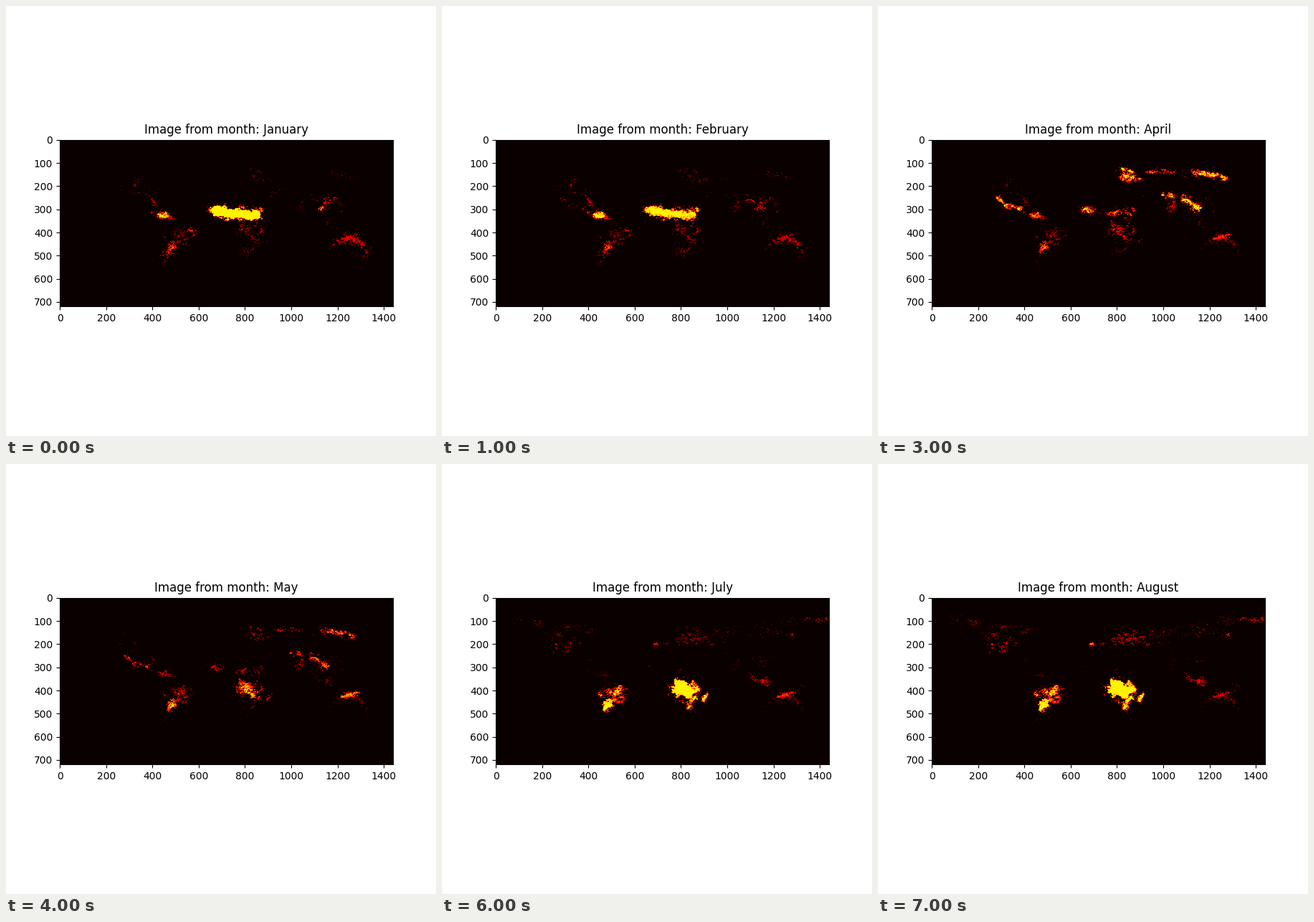
A matplotlib script that plays this animation: 600x600 px, repeating every 8000 ms.

```python
import numpy as np
import matplotlib.pyplot as plt
from matplotlib.animation import FuncAnimation

MONTHS = ["January", "February", "March", "April",
          "May", "June", "July", "August"]
COLS, ROWS = 465, 232
EXTENT = (-0.5, 1439.5, 719.5, -0.5)
CAP = 0.73                     # brightest value: yellow, never white

X, Y = np.meshgrid((np.arange(COLS) + 0.5) * 1440 / COLS,
                   (np.arange(ROWS) + 0.5) * 720 / ROWS)
heat = np.zeros((len(MONTHS), ROWS, COLS))


def clumpy_noise(seed, power):
    """Uniform noise in 0..1, slightly stretched sideways."""
    white = np.random.default_rng(seed).standard_normal((ROWS, COLS))
    freq = np.hypot(np.fft.fftfreq(ROWS)[:, None], 1.4 * np.fft.fftfreq(COLS))
    field = np.fft.ifft2(np.fft.fft2(white) / (freq + 0.03) ** power).real
    return field.ravel().argsort().argsort().reshape(ROWS, COLS) / field.size


def season(month, spread):
    """Bell curve over the months, January being 0."""
    return np.exp(-((np.arange(len(MONTHS)) - month) / spread) ** 2)


def distance(points):
    """Distance of every cell to a line through the points."""
    best = np.full(X.shape, np.inf)
    for (x0, y0), (x1, y1) in zip(points, points[1:] or points):
        dx, dy = x1 - x0, y1 - y0
        t = ((X - x0) * dx + (Y - y0) * dy) / max(dx * dx + dy * dy, 1)
        t = np.clip(t, 0, 1)
        best = np.minimum(best, np.hypot(X - x0 - t * dx, Y - y0 - t * dy))
    return best


def burn(when, peak, width, *points, base=0.0):
    """Fire belt along points, ragged at the edge, rising from base."""
    shape = np.exp(-(distance(points) / width * (0.6 + 0.8 * rough)) ** 3)
    level = base + peak * when
    np.maximum(heat, level[:, None, None] * shape, out=heat)


rough = clumpy_noise(3, 1.5)

new_year = season(-0.5, 2.5)
dry = season(1.2, 2.8)
thaw = season(2, 0.9)
spring = season(3.2, 1.3)
long_spring = season(2.8, 2)
summer = season(6.8, 1.5)
southern = season(6.8, 2.6)

# North America
burn(season(7.5, 0.6), 0.6, 6, (75, 84), (152, 83))
burn(summer, 0.32, 18, (100, 95), (215, 108), (345, 138), (465, 136))
burn(summer, 0.4, 34, (250, 170), (275, 220), (335, 200), base=0.12)
burn(dry, 0.35, 20, (335, 175), (340, 225), (400, 240), (410, 280), base=0.12)
burn(long_spring, 1, 13, (285, 250), (315, 282), (385, 300))

# South America
burn(dry, 0.4, 15, (400, 318), (485, 345), base=0.15)
burn(dry, 1, 18, (425, 333), (460, 326), base=0.1)
burn(southern, 0.4, 27, (455, 410), (490, 425), (540, 395), base=0.32)
burn(southern, 0.65, 15, (450, 412), (490, 408), base=0.25)
burn(southern, 0.65, 16, (515, 412), (542, 385), base=0.35)
burn(southern, 0.4, 18, (485, 445), (545, 440), base=0.33)
burn(southern, 0.6, 20, (475, 466), (492, 456), base=0.7)
burn(new_year, 0.45, 18, (555, 385), (578, 398), base=0.2)
burn(new_year, 0.3, 25, (440, 510), (480, 465), base=0.3)

# Africa
burn(dry, 1.25, 18, (658, 307), (685, 313))
burn(new_year, 1.95, 23, (680, 315), (780, 324), (850, 330))
burn(dry, 0.9, 17, (770, 322), (866, 308), (846, 345), base=0.1)
burn(southern, 1.8, 34, (795, 392), (832, 408), base=0.3)
burn(southern, 0.9, 13, (778, 365), (784, 388), base=0.55)
burn(summer, 1.3, 24, (838, 410), (862, 392), base=0.3)
burn(summer, 0.7, 15, (850, 367), (874, 395), base=0.5)
burn(summer, 0.75, 15, (835, 475), (848, 440), base=0.35)
burn(dry, 0.4, 23, (805, 494), (850, 450), (828, 425))
burn(southern, 1, 10, (896, 446), (912, 418), base=0.15)

# Europe and northern Asia
burn(thaw, 0.25, 30, (690, 140), (720, 175), base=0.08)
burn(thaw, 0.65, 22, (808, 142), (838, 160))
burn(thaw, 0.5, 15, (890, 178), (1030, 178), base=0.1)
burn(season(3, 0.8), 0.7, 15, (830, 125), (860, 142), (825, 162), (895, 165),
     base=0.2)
burn(spring, 0.72, 16, (930, 142), (1000, 138), (1060, 148), (1130, 136))
burn(spring, 0.8, 15, (1140, 145), (1200, 150), (1265, 168), base=0.2)
burn(summer, 0.8, 13, (690, 203))
burn(summer, 0.36, 18, (700, 208), (860, 200), (1010, 208))
burn(summer, 0.42, 27, (790, 180), (900, 165), (1070, 148))
burn(summer, 0.35, 24, (1060, 142), (1260, 112))
burn(summer, 0.45, 22, (1150, 148))
burn(summer, 0.4, 16, (1280, 160), base=0.15)
burn(summer, 0.45, 15, (1250, 105), (1425, 95))

# Southern Asia
burn(new_year, 0.3, 10, (910, 232), (985, 207), base=0.1)
burn(spring, 0.75, 13, (1000, 238), (1045, 244), base=0.15)
burn(long_spring, 0.4, 20, (1035, 265), (1035, 295), base=0.1)
burn(long_spring, 0.95, 20, (1095, 262), (1120, 278), (1148, 300), base=0.1)
burn(new_year, 0.85, 17, (1130, 297), base=0.1)
burn(new_year, 0.35, 20, (1145, 270), (1190, 248), base=0.22)
burn(dry, 0.35, 14, (1203, 285), (1208, 315), base=0.12)
burn(southern, 0.4, 17, (1115, 350), (1175, 370), base=0.1)

# Australia
burn(new_year, 0.25, 23, (1185, 448), (1240, 430), (1300, 428), (1326, 485),
     base=0.24)
burn(season(4.5, 2), 0.4, 12, (1218, 428), (1250, 417), (1290, 412), base=0.35)
burn(southern, 0.4, 18, (1308, 385))
burn(new_year, 0.4, 13, (1310, 503), base=0.15)

excess = heat ** 1.5 + clumpy_noise(7, 1) - 1
fires = np.where(excess > 0, np.minimum(0.06 + 0.9 * excess, CAP), 0)

fig, ax = plt.subplots(figsize=(6, 6), dpi=100)
image = ax.imshow(fires[0], cmap="hot", vmin=0, vmax=1,
                  extent=EXTENT, interpolation="nearest")
title = ax.set_title("Image from month: " + MONTHS[0])


def update(month):
    image.set_data(fires[month])
    title.set_text("Image from month: " + MONTHS[month])
    return image, title


anim = FuncAnimation(fig, update, frames=len(MONTHS), interval=1000,
                     repeat=True, repeat_delay=0)
plt.show()
```
